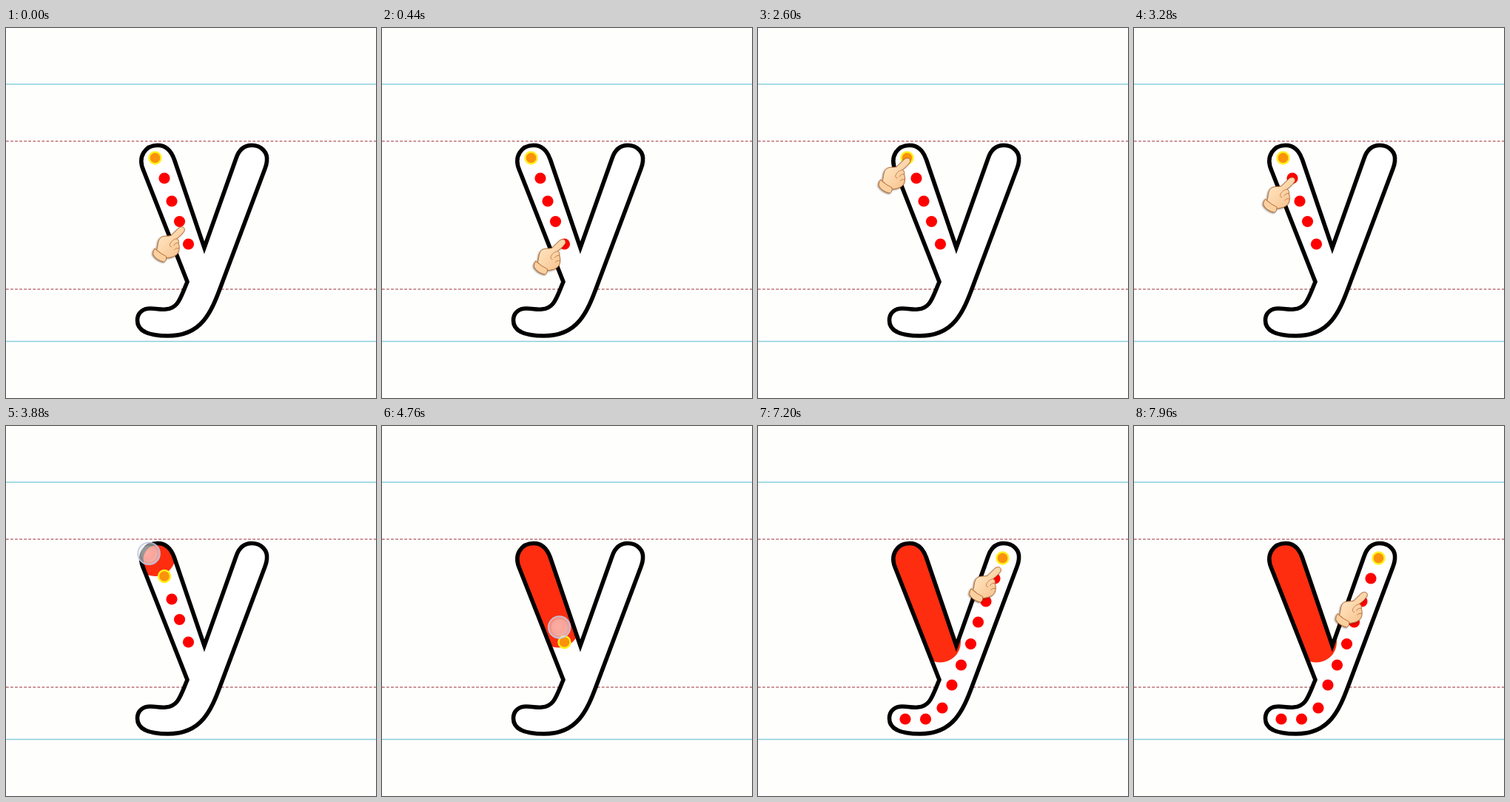
Recreate the animation shown at these times as an HTML page. Size 500 by 500 pixels, loop 8000 ms.

```html
<!DOCTYPE html>
<html lang="en">
<head>
<meta charset="utf-8">
<title>Trace the letter y</title>
<style>
  html, body { margin: 0; width: 100%; height: 100%; overflow: hidden; background: #fefefd; }
  svg { display: block; width: 100%; height: 100%; }
  .rule { stroke: #86cfda; stroke-width: 1.7; }
  .dash { stroke: #bd7076; stroke-width: 1.3; stroke-dasharray: 3.7 2.36; }
  .dot { fill: #fe0000; }
  .dot.next { fill: #fb920c; stroke: #fff01c; stroke-width: 2.4; }
  #hand { filter: drop-shadow(-1px 1px 1.2px rgba(60, 35, 15, .55)); }
</style>
</head>
<body>
<svg viewBox="0 0 500 500">
  <defs>
    <path id="letter" d="M186 193 C177 173 189 158.500 205 158.500 C217 158.500 224 168 227.500 178
      L268 297 L311 176 C315 164 322 158.500 332 158.500 C345 158.500 354 168 352.500 180 Q352 185 350 190
      L290 350 C277 385 264 416 219 416 C193 416 177.500 410 177.500 395
      C177.500 384 186 379 195 379 C204 379 209 381 216 380 C233 379 236 364 245 343 Z"/>
    <clipPath id="inside"><use href="#letter"/></clipPath>
    <radialGradient id="glass" cx=".45" cy=".45">
      <stop offset="0" stop-color="#fff" stop-opacity=".5"/>
      <stop offset=".65" stop-color="#ececee" stop-opacity=".5"/>
      <stop offset="1" stop-color="#dcdde4" stop-opacity=".7"/>
    </radialGradient>
    <linearGradient id="skin" x1="0" y1="0" x2="1" y2="1">
      <stop offset=".3" stop-color="#ffdfb8"/>
      <stop offset="1" stop-color="#f5bd86"/>
    </linearGradient>
  </defs>

  <path class="rule" d="M0 76H500M0 423.500H500"/>
  <path class="dash" d="M0 153H500M0 353H500"/>
  <use href="#letter" fill="#fff"/>
  <g clip-path="url(#inside)">
    <path id="paint" fill="none" stroke="#fe2d10" stroke-width="55" stroke-linecap="round" stroke-linejoin="round"/>
  </g>
  <use href="#letter" fill="none" stroke="#000" stroke-width="5.600"/>
  <g id="dots"></g>

  <g id="hand" stroke="#b87037" stroke-width="1" stroke-linejoin="round" stroke-linecap="round">
    <path fill="url(#skin)" d="M241 292.500 C245 288 251 290 249.500 295.500 Q247 300 239 306
      C241.500 307 242 309 241.500 312 C243 316 243 321 241 325 C238 330 231 332 224 332
      L212 321 C214 316 213 309 217 305 C221 301.500 226 303 231 302 Z"/>
    <path fill="#fbd0a0" d="M209.500 319.500 Q218 327 225 330 Q226 335 222 337.500 Q211 335 207 327 Q207 322 209.500 319.500 Z"/>
    <path fill="none" stroke-width=".8" d="M239 306 Q233 307 230 313 Q229 317 232 317 M241.500 312 Q237 311 235 315 M242 319 Q238 318 236 321"/>
  </g>

  <g id="touch">
    <circle r="15" fill="url(#glass)" stroke="#bcc4e2" stroke-width="1.400"/>
    <circle r="11" fill="#fff" fill-opacity=".22"/>
  </g>
</svg>
<script>
const LOOP = 8000;
const FINGERTIP = { x: 246.5, y: 292 };
const PAINT_START = 3680, SECOND_START = 5160;
const TOUCH_FROM = [192, 170], TOUCH_TO = [276, 350];

const $ = id => document.getElementById(id);
const svgEl = name => document.createElementNS('http://www.w3.org/2000/svg', name);
const clamp = x => Math.min(1, Math.max(0, x));
const ramp = (t, from, to) => clamp((t - from) / (to - from));
const swing = x => (1 - Math.cos(Math.PI * x)) / 2;
const mix = (a, b, x) => a + (b - a) * x;

function makeStroke(points) {
  const path = svgEl('path');
  path.setAttribute('d', 'M' + points.join('L'));
  const dots = points.map(([x, y]) => {
    const dot = $('dots').appendChild(svgEl('circle'));
    dot.setAttribute('cx', x);
    dot.setAttribute('cy', y);
    return dot;
  });
  return { points, path, dots, length: path.getTotalLength() };
}

const first = makeStroke([[201.5, 175.5], [214, 203], [224, 234], [234.5, 261.5], [246.5, 292]]);
const second = makeStroke([[330.5, 178.5], [320, 206], [308, 237], [297.5, 265], [287.5, 294.5],
  [274.5, 323], [262, 350], [249, 381], [226.5, 396], [199, 396]]);
$('paint').setAttribute('d', first.path.getAttribute('d'));

// Each pass: stroke, fade in, start of the move, its duration, fade out.
const passes = [
  { stroke: first, show: -2000, move: -2010, span: 2800, hide: 1400 },
  { stroke: first, show: 1600, move: 2350, span: 2800, hide: 3600 },
  { stroke: second, show: 5500, move: 6350, span: 5640, hide: 9000 }
];

// The next dot to reach is highlighted; earlier ones are gone.
function showDots({ dots }, next) {
  dots.forEach((dot, i) => {
    dot.style.display = i < next ? 'none' : '';
    dot.setAttribute('class', i === next ? 'dot next' : 'dot');
    dot.setAttribute('r', i === next ? 8 : 7.6);
  });
}

function drawHand(t) {
  const { stroke, show, move, span, hide } = passes.find(p => t < p.hide + 120);
  const along = swing(ramp(t, move, move + span));
  const tip = stroke.path.getPointAtLength(along * stroke.length);
  $('hand').setAttribute('transform', `translate(${tip.x - FINGERTIP.x} ${tip.y - FINGERTIP.y})`);
  $('hand').style.opacity = ramp(t, show, show + 120) * (1 - ramp(t, hide, hide + 120));
}

// Moves the touch bubble and returns its height on the page.
function drawTouch(t) {
  const u = ramp(t, 3860, 5450);
  const [x, y] = TOUCH_FROM.map((from, i) => mix(from, TOUCH_TO[i], u));
  $('touch').setAttribute('transform', `translate(${x} ${y})`);
  $('touch').style.opacity = ramp(t, 3640, 3740) * (1 - ramp(t, 5500, 5840));
  return y;
}

function drawPaint(t, touchY) {
  const painting = t >= PAINT_START;
  const [top, bottom] = [first.points[0][1], first.points.at(-1)[1]];
  const reach = ramp(touchY, top, bottom);
  $('paint').style.display = painting ? '' : 'none';
  $('paint').style.strokeDasharray = `${Math.max(.01, reach * first.length)} 1000`;

  const passed = first.points.filter(p => p[1] <= mix(top, bottom, reach) + .01).length;
  showDots(first, painting ? passed : 0);
  showDots(second, t >= SECOND_START ? 0 : second.dots.length);
}

const begin = performance.now();
function draw() {
  const t = (performance.now() - begin) % LOOP;
  drawHand(t);
  drawPaint(t, drawTouch(t));
  requestAnimationFrame(draw);
}
draw();
</script>
</body>
</html>
```
